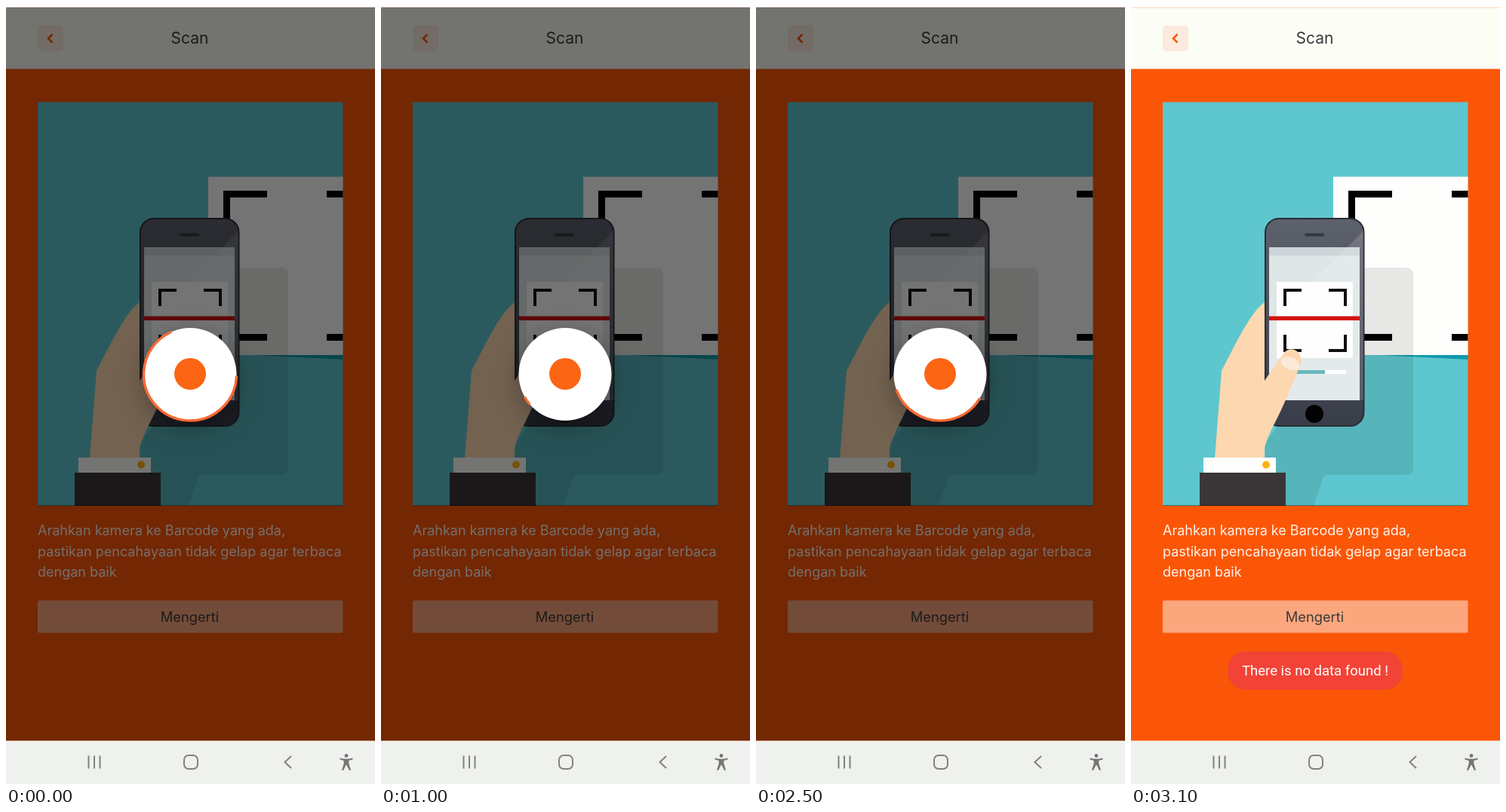
Write an HTML page that moves like this. It is 489 px wide and 1032 px high and loops after 3.9 s.

```html
<!DOCTYPE html>
<html lang="id">
<head>
<meta charset="utf-8">
<title>Scan</title>
<style>
  html, body { margin: 0; width: 100%; height: 100%; overflow: hidden; background: #eff1ee; }
  svg { display: block; width: 100vw; height: 100vh; }
  text { font: 18px Inter, sans-serif; }
  .mid { text-anchor: middle; fill: #3a3a3a; }
  .line { fill: none; stroke: #80827f; stroke-width: 2; }
  .disc { filter: drop-shadow(0 9px 16px rgba(0, 0, 0, .3)); }
</style>
</head>
<body>
<svg viewBox="0 0 489 1032" preserveAspectRatio="none">
  <defs>
    <clipPath id="frame"><rect x="42" y="127.5" width="404.5" height="535.5"/></clipPath>
    <linearGradient id="metal" x2="0" y2="1">
      <stop stop-color="#5d616c"/><stop offset="1" stop-color="#393d49"/>
    </linearGradient>
  </defs>

  <!-- page -->
  <rect width="489" height="975" fill="#fb5607"/>
  <rect width="489" height="83.5" fill="#fcfdf5"/>
  <rect y="1" width="489" height="2" fill="#fde0d0"/>
  <rect x="42" y="26" width="34" height="34" rx="5" fill="#fbeade"/>
  <path d="M61.500 37.500l-5.500 5.500 5.500 5.500" fill="none" stroke="#fa5606" stroke-width="2.500"/>
  <text class="mid" x="243.5" y="50" style="font-size:21px">Scan</text>

  <!-- illustration -->
  <g clip-path="url(#frame)">
    <rect x="42" y="127" width="405" height="536" fill="#5ec6ce"/>
    <path d="M310 462H447V469Z" fill="#0d9aab"/>
    <rect x="268" y="226.500" width="179" height="236.500" fill="#fefefd"/>
    <path d="M346 249.500H292.500V290M425 249.500H450M300 439.500H346M425 439.500H450" fill="none" stroke="#000" stroke-width="9"/>
    <path d="M250 347H364q10 0 10 10V612q0 10-10 10H260q-4 0-6 5L242 663H178V580L200 550Z" fill="#000" opacity=".09"/>

    <rect x="178" y="282" width="130.5" height="275" rx="18" fill="url(#metal)" stroke="#292d34" stroke-width="2"/>
    <rect x="230" y="301.500" width="26" height="4" rx="2" fill="#33373f"/>
    <rect x="183" y="320" width="120" height="203" fill="#dfe6e7"/>
    <rect x="183" y="320" width="120" height="11" fill="#ccd5d8"/>
    <path d="M308 298L183 427V523H308Z" fill="#fff" opacity=".15"/>
    <rect x="193" y="366" width="101" height="101" fill="#fdfefd"/>
    <path d="M226 377H204V398M262 377H284V398M226 457H204V436M262 457H284V436" fill="none" stroke="#111" stroke-width="4"/>
    <rect x="183" y="411.500" width="120" height="5.500" fill="#d3110f"/>
    <rect x="215" y="483" width="70" height="5" fill="#fff"/>
    <rect x="215" y="483" width="42" height="5" fill="#68babd"/>
    <circle cx="243" cy="541" r="12" fill="#030303"/>

    <path d="M177 393C162 404 149 427 120 484L111 600H177V586C182 567 194 548 203 527L225 475C229 458 211 449 203 460L177 497Z" fill="#fcd7b0"/>
    <ellipse cx="211" cy="474" rx="13" ry="8" transform="rotate(20 211 474)" fill="#fde9d8"/>
    <rect x="96" y="599" width="96" height="20" fill="#fdfdfb"/>
    <circle cx="179" cy="608.500" r="5" fill="#ffb30f"/>
    <rect x="91" y="619" width="114" height="44" fill="#3a3537"/>
    <rect x="42" y="662" width="405" height="1" opacity=".4"/>
  </g>

  <g fill="#fff3ea">
    <text x="42" y="702">Arahkan kamera ke Barcode yang ada,</text>
    <text x="42" y="729.500">pastikan pencahayaan tidak gelap agar terbaca</text>
    <text x="42" y="756.500">dengan baik</text>
  </g>
  <rect x="42" y="788.500" width="404.500" height="43" rx="2" fill="#fca67d"/>
  <text class="mid" x="243.500" y="817" style="font-size:18.300px">Mengerti</text>

  <!-- system bar -->
  <rect y="974.500" width="489" height="57.500" fill="#eff1ee"/>
  <path class="line" d="M109.500 994.500V1011.500M117 994.500V1011.500M124.500 994.500V1011.500M378 995l-8.500 8 8.500 8"/>
  <rect class="line" x="236" y="994" width="18" height="18" rx="6"/>
  <g fill="#747673">
    <circle cx="451" cy="994.500" r="2.400"/>
    <path d="M442.500 997.500Q451 1000 459.500 997.500V999.500L454.300 1001V1005L457 1013.500 455 1014 451.500 1007H450.500L447 1014 445 1013.500 447.700 1005V1001L442.500 999.500Z"/>
  </g>

  <!-- loading dialog -->
  <rect id="shade" y="1.500" width="489" height="973"/>
  <g id="loader">
    <circle class="disc" cx="244" cy="488.500" r="61.500" fill="#fff"/>
    <circle cx="244" cy="488" r="21" fill="#fb6514"/>
    <circle id="arc" cx="244" cy="488.500" r="61.500" pathLength="360" fill="none" stroke="#f96a32" stroke-width="3.400" stroke-linecap="square"/>
  </g>
  <rect width="489" height="1.500" fill="#fff"/>

  <g id="toast">
    <rect x="128" y="856" width="232" height="51" rx="24" fill="#f24336"/>
    <text x="244" y="888" text-anchor="middle" fill="#fff" style="font:18.500px Roboto,sans-serif">There is no data found !</text>
  </g>
</svg>
<script>
const LOOP = 3900, STEP = 100, LAST = 3100;
const [shade, loader, arc, toast] = ['shade', 'loader', 'arc', 'toast'].map(id => document.getElementById(id));
const clamp = x => Math.min(1, Math.max(0, x));

// cubic-bezier(.4, 0, .2, 1)
function ease(x) {
  let lo = 0, hi = 1, s = .5;
  for (let i = 0; i < 20; i++) {
    s = (lo + hi) / 2;
    const u = 1 - s;
    if (1.2 * u * u * s + .6 * u * s * s + s ** 3 < x) lo = s; else hi = s;
  }
  return s * s * (3 - 2 * s);
}

function draw(t) {
  // The head runs ahead in the first half of a cycle, the tail catches up in the second.
  const phase = (.31 + t / 1345) % 1;
  const head = 270 * ease(clamp(phase * 2));
  const tail = 270 * ease(clamp(phase * 2 - 1));
  const start = tail - 24 + 90 * phase + 360 * t / 2242;
  arc.setAttribute('stroke-dasharray', `${Math.max(head - tail, .1)} 400`);
  arc.setAttribute('transform', `rotate(${start} 244 488.5)`);

  const fade = clamp((2656 - t) / 100);
  shade.setAttribute('opacity', .54 * fade);
  loader.setAttribute('opacity', fade ** 1.4);
  toast.setAttribute('opacity', clamp((t - 2510) / 500));
}

// The picture advances ten times a second, then rests.
const begin = performance.now();
function tick() {
  const t = (performance.now() - begin) % LOOP;
  draw(Math.min(LAST, Math.floor(t / STEP) * STEP));
  requestAnimationFrame(tick);
}
tick();
</script>
</body>
</html>
```
